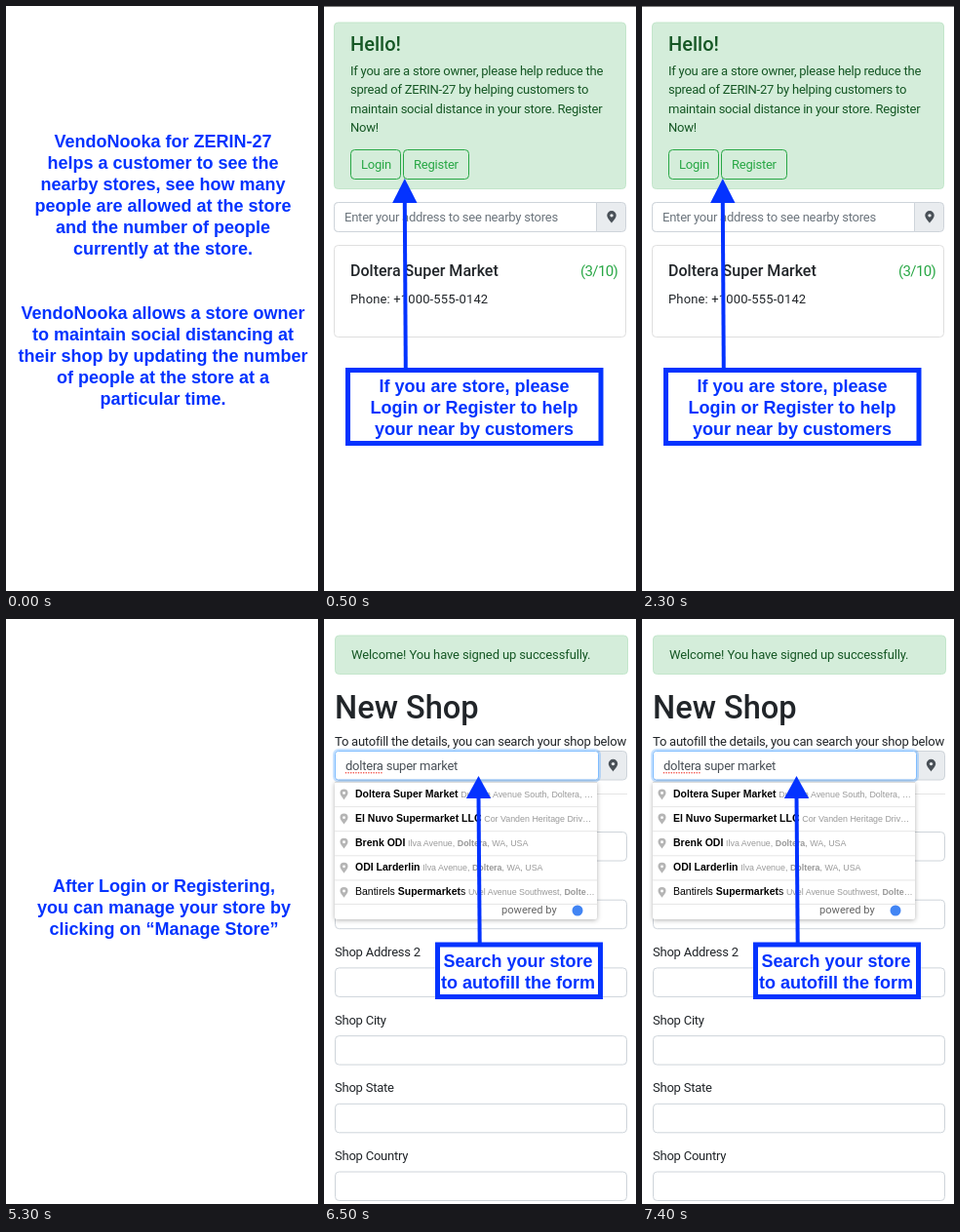
Write an HTML page that moves like this. It is 320x600 px and loops after 8000 ms.

```html
<!DOCTYPE html>
<html lang="en">
<head>
<meta charset="utf-8">
<title>Store guide</title>
<style>
html, body { margin: 0; width: 100%; height: 100%; overflow: hidden; background: #fff; }
svg { display: block; width: 100%; height: 100%; }
text { white-space: pre; }
.note { font: bold 18px "Liberation Sans", Arial, sans-serif; fill: #0433ff; text-anchor: middle; }
.ui { font: 13px Roboto, sans-serif; letter-spacing: -.23px; fill: #212529; }
.head { font-weight: 500; letter-spacing: 0; }
.row { font: 10.5px "Liberation Sans", Arial, sans-serif; fill: #000; }
.row .sub { font-size: 8.9px; fill: #999; }
.row .b { font-weight: bold; }
</style>
</head>
<body>
<svg id="stage" viewBox="0 0 320 600" xmlns="http://www.w3.org/2000/svg"></svg>
<script>
const NS = "http://www.w3.org/2000/svg";
const stage = document.getElementById("stage");
const BLUE = "#0433ff", GREEN = "#28a745", LEAF = "#155724";
const LINE = "#ced4da", GREY = "#495057";

function add(parent, tag, attrs, content) {
  const el = document.createElementNS(NS, tag);
  for (const key in attrs) el.setAttribute(key, attrs[key]);
  if (content) el.textContent = content;
  parent.appendChild(el);
  return el;
}

// Rectangle given by its outer edges, with the border inside them.
function box(g, x1, y1, x2, y2, fill, stroke, r = 4, w = 1) {
  return add(g, "rect", {
    x: x1 + w / 2, y: y1 + w / 2, width: x2 - x1 - w, height: y2 - y1 - w,
    rx: r, fill, stroke, "stroke-width": w
  });
}

function ui(g, x, y, content, fill = "#212529", style = "") {
  return add(g, "text", { class: "ui", x, y, style: `fill:${fill};${style}` }, content);
}

function head(g, x, y, content, fill, size) {
  const el = ui(g, x, y, content, fill, `font-size:${size}px`);
  el.classList.add("head");
}

function note(g, x, y, lines) {
  lines.forEach((line, i) => {
    if (line) add(g, "text", { class: "note", x, y: y + i * 22 }, line);
  });
}

function pin(g, x, y, scale, fill, hole) {
  const p = add(g, "g", { transform: `translate(${x} ${y}) scale(${scale})` });
  add(p, "path", { d: "M0 6C-1.2 3.9-4.5 1-4.5-1.6A4.5 4.5 0 0 1 4.5-1.6C4.5 1 1.2 3.9 0 6Z", fill });
  add(p, "circle", { cx: 0, cy: -1.6, r: 1.6, fill: hole });
}

function arrow(g, x, tip, base, x2, bottom) {
  add(g, "path", { d: `M${x} ${base - 2}L${x2} ${bottom}`, stroke: BLUE, "stroke-width": 4 });
  add(g, "path", { d: `M${x} ${tip}L${x + 12.7} ${base}H${x - 12.7}Z`, fill: BLUE });
}

function search(g, x1, y1, xm, x2, y2) {
  box(g, x1, y1, x2, y2, "#e9ecef", LINE);
  add(g, "path", {
    d: `M${xm - .5} ${y1 + .5}H${x1 + 4.5}q-4 0-4 4V${y2 - 4.5}q0 4 4 4H${xm - .5}Z`,
    fill: "#fff", stroke: LINE
  });
  pin(g, (xm + x2) / 2, (y1 + y2) / 2, 1.05, GREY, "#e9ecef");
}

function drawIntro(g) {
  note(g, 161, 145, [
    "VendoNooka for ZERIN-27",
    "helps a customer to see the",
    "nearby stores, see how many",
    "people are allowed at the store",
    "and the number of people",
    "currently at the store.",
    "", "",
    "VendoNooka allows a store owner",
    "to maintain social distancing at",
    "their shop by updating the number",
    "of people at the store at a",
    "particular time."
  ]);
}

function drawHome(g) {
  add(g, "rect", { width: 320, height: 1, fill: "#808080" });
  box(g, 10, 16.5, 310, 188, "#d4edda", "#c3e6cb");
  head(g, 27, 46, "Hello!", LEAF, 20);
  [
    "If you are a store owner, please help reduce the",
    "spread of ZERIN-27 by helping customers to",
    "maintain social distance in your store. Register",
    "Now!"
  ].forEach((line, i) => ui(g, 27, 70.5 + i * 19.5, line, LEAF));
  box(g, 27, 147, 79, 178, "none", GREEN);
  ui(g, 38, 167, "Login", GREEN);
  box(g, 81, 147, 149, 178, "none", GREEN);
  ui(g, 92, 167, "Register", GREEN);

  search(g, 10, 201, 280, 310, 232);
  ui(g, 21, 221, "Enter your address to see nearby stores", "#6c757d");

  box(g, 10, 245, 310, 340, "#fff", "#dfdfdf");
  head(g, 27, 277, "Doltera Super Market", "#212529", 16);
  ui(g, 263, 277, "(3/10)", GREEN, "font-size:15px;letter-spacing:-.6px");
  ui(g, 27, 305, "Phone: +1000-555-0142", "#212529", "letter-spacing:.15px");

  arrow(g, 82.8, 177, 202, 83.8, 373);
  box(g, 22, 371, 286.5, 451, "#fff", BLUE, 0, 5);
  note(g, 154, 396, [
    "If you are store, please",
    "Login or Register to help",
    "your near by customers"
  ]);
}

function drawManage(g) {
  note(g, 162, 280, [
    "After Login or Registering,",
    "you can manage your store by",
    "clicking on \u201cManage Store\u201d"
  ]);
}

// Each part is [classes, text].
const places = [
  [["b", "Doltera Super Market"], ["sub", "Dunova Avenue South, Doltera, \u2026"]],
  [["b", "El Nuvo Supermarket LLC"], ["sub", "Cor Vanden Heritage Driv\u2026"]],
  [["b", "Brenk ODI"], ["sub", "Ilva Avenue, "], ["sub b", "Doltera"], ["sub", ", WA, USA"]],
  [["b", "ODI Larderlin"], ["sub", "Ilva Avenue, "], ["sub b", "Doltera"], ["sub", ", WA, USA"]],
  [["", "Bantirels "], ["b", "Supermarket"], ["", "s"],
   ["sub", "Uvel Avenue Southwest, "], ["sub b", "Dolte"], ["sub", "\u2026"]]
];

function drawList(g) {
  const shade = add(g, "rect", { x: 11, y: 167, width: 269, height: 141, rx: 2, fill: "#fff" });
  shade.style.filter = "drop-shadow(0 1.5px 2.5px rgba(0,0,0,.3))";
  places.forEach((parts, i) => {
    const y = 167 + i * 25.1;
    add(g, "path", { d: `M11 ${y + .5}H280`, stroke: i ? "#e6e6e6" : "#d9d9d9" });
    pin(g, 20.5, y + 13, .9, "#b5b5b5", "#fff");
    const row = add(g, "text", { class: "row", x: 32, y: y + 16 });
    let sub = false;
    for (const [cls, content] of parts) {
      const span = add(row, "tspan", { class: cls }, content);
      if (!sub && cls.startsWith("sub")) {
        span.setAttribute("dx", 2.7);
        sub = true;
      }
    }
  });
  add(g, "path", { d: "M11 292.5H280", stroke: "#e6e6e6" });
  ui(g, 182, 302, "powered by", "#666", "font-size:11.1px;letter-spacing:0");
  add(g, "circle", { cx: 260, cy: 299, r: 5.5, fill: "#4285f4" });
}

function drawForm(g) {
  box(g, 11, 16.5, 312, 57, "#d4edda", "#c3e6cb");
  ui(g, 28, 41, "Welcome! You have signed up successfully.", LEAF, "letter-spacing:-.12px");
  head(g, 11, 102, "New Shop", "#212529", 32.6);
  ui(g, 11, 130, "To autofill the details, you can search your shop below");

  add(g, "path", { d: "M11 179.5H311", stroke: "#e5e5e5" });
  for (let i = 0; i < 6; i++) {
    const y = 218 + i * 69.7;
    box(g, 11, y, 311, y + 30.5, "#fff", LINE);
  }
  ["Address 2", "City", "State", "Country"].forEach((name, i) =>
    ui(g, 11, 346 + i * 69.7, "Shop " + name));

  search(g, 11, 135, 282, 311, 165.5);
  box(g, 9, 133, 284, 167.5, "none", "rgba(0,123,255,.22)", 5, 2);
  box(g, 11, 135, 282, 165.5, "#fff", "#80bdff", 3);
  ui(g, 22, 155, "doltera super market", GREY);
  add(g, "path", {
    d: "M22.5 157.8H61", stroke: "#f0483e", "stroke-width": 1.6,
    "stroke-linecap": "round", "stroke-dasharray": "0 2.6"
  });

  drawList(g);
  arrow(g, 158.5, 161, 184, 159.7, 333);
  box(g, 114, 331.5, 286, 390, "#fff", BLUE, 0, 5);
  note(g, 199, 357, ["Search your store", "to autofill the form"]);
}

const LOOP = 8000;
const starts = [0, 500, 3500, 6500];
const scenes = [drawIntro, drawHome, drawManage, drawForm].map(draw => {
  const g = add(stage, "g", {});
  draw(g);
  return g;
});

function show(time) {
  const t = time % LOOP;
  const now = starts.filter(s => s <= t).length - 1;
  scenes.forEach((g, i) => g.setAttribute("display", i === now ? "inline" : "none"));
}

const begin = performance.now();
function tick() {
  show(performance.now() - begin);
  requestAnimationFrame(tick);
}
tick();
</script>
</body>
</html>
```
